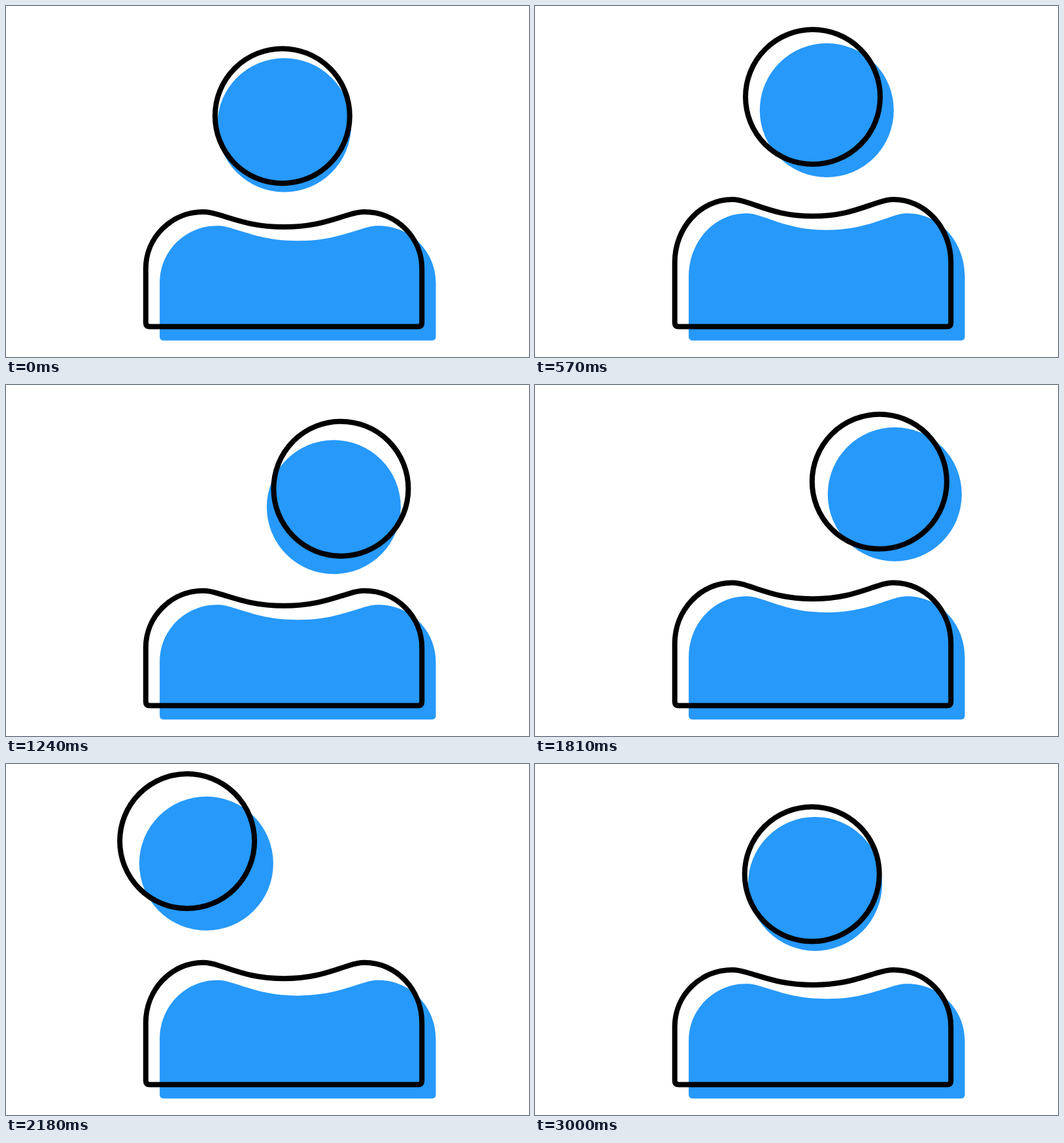
Animation, 800 px wide and 537 px high, one loop 3.03 s. Source, as an HTML page:

```html
<!DOCTYPE html>
<html lang="en">
<head>
<meta charset="utf-8">
<title>Bobbing person</title>
<style>
html, body { margin: 0; width: 100%; height: 100%; overflow: hidden; background: #fff; }
svg { display: block; width: 800px; height: 537px; }
.fill { fill: #2699fb; }
.line { fill: none; stroke: #000; stroke-width: 8; stroke-linejoin: round; }
</style>
</head>
<body>
<svg viewBox="0 0 800 537">
  <g class="fill" transform="translate(21.3 21.2)"><circle r="102.5"/><path/></g>
  <g class="line"><circle r="103"/><path/></g>
</svg>
<script>
const LOOP = 3030, CYCLE = 2992, LAG = 71, BASE = 490.5, REST = 315;

const smooth = u => u * u * (3 - 2 * u);
const clamp = u => Math.min(1, Math.max(0, u));

// cubic-bezier(.333, 0, .2, 1), solved by bisection
function swift(u) {
  let lo = 0, hi = 1;
  for (let i = 0; i < 20; i++) {
    const p = (lo + hi) / 2, q = 1 - p;
    if (q * q * p + 0.6 * q * p * p + p ** 3 < u) lo = p; else hi = p;
  }
  return smooth(lo);
}

// head moves: start, end, path, easing
const moves = [
  [-407, 33, 'M276 112L425 169', smooth],
  [33, 290, 'M425 169V132', smooth],
  [290, 480, 'M425 132V138.3', smooth],
  [520, 1046, 'M425 138.3V168', smooth],
  [1046, 1426, 'M425 168C470 168 520 165 529 146', swift],
  [1784, 2275, 'M529 146C500 175 280 175 276 112', swift],
  [2585, 3025, 'M276 112L425 169', smooth]
].map(([start, end, d, ease]) => {
  const path = document.createElementNS('http://www.w3.org/2000/svg', 'path');
  path.setAttribute('d', d);
  return { start, end, path, ease, length: path.getTotalLength() };
});

// shoulder height over time
const shoulders = [
  [0, REST], [300, 294], [480, 296], [600, 296], [1000, REST], [1210, REST],
  [1640, 302], [1785, 302], [1985, REST], [2340, 295.5], [2515, 296], [2840, REST]
];

function headAt(t) {
  const m = moves.findLast(m => m.start <= t);
  const u = clamp((t - m.start) / (m.end - m.start));
  return m.path.getPointAtLength(m.ease(u) * m.length);
}

function shoulderAt(t) {
  const i = shoulders.findIndex(k => k[0] > t);
  if (i < 1) return REST;
  const [t0, a] = shoulders[i - 1], [t1, b] = shoulders[i];
  return a + (b - a) * smooth((t - t0) / (t1 - t0));
}

// torso stretched upwards from its fixed base
function torso(top) {
  const k = (BASE - top) / (BASE - REST);
  const y = v => (BASE - (BASE - v) * k).toFixed(2);
  return `M213.8 ${y(402)}C213.8 ${y(354)} 253 ${y(315)} 301.5 ${y(315)}
    C311 ${y(315)} 318 ${y(317)} 326 ${y(319.5)}
    C352 ${y(327)} 378 ${y(338)} 425 ${y(338)}
    C472 ${y(338)} 498 ${y(327)} 524 ${y(319.5)}
    C532 ${y(317)} 539 ${y(315)} 548.5 ${y(315)}
    C597 ${y(315)} 636.2 ${y(354)} 636.2 ${y(402)}
    V484.5q0 6 -6 6H219.8q-6 0 -6 -6Z`;
}

function pose(group, t) {
  const [head, body] = group.children, { x, y } = headAt(t);
  head.setAttribute('cx', x);
  head.setAttribute('cy', y);
  body.setAttribute('d', torso(shoulderAt(t)));
}

const [fill, line] = document.querySelectorAll('g');
const begin = performance.now();

function draw() {
  const t = (performance.now() - begin) % LOOP % CYCLE;
  pose(fill, t - LAG);
  pose(line, t);
  requestAnimationFrame(draw);
}
draw();
</script>
</body>
</html>
```
